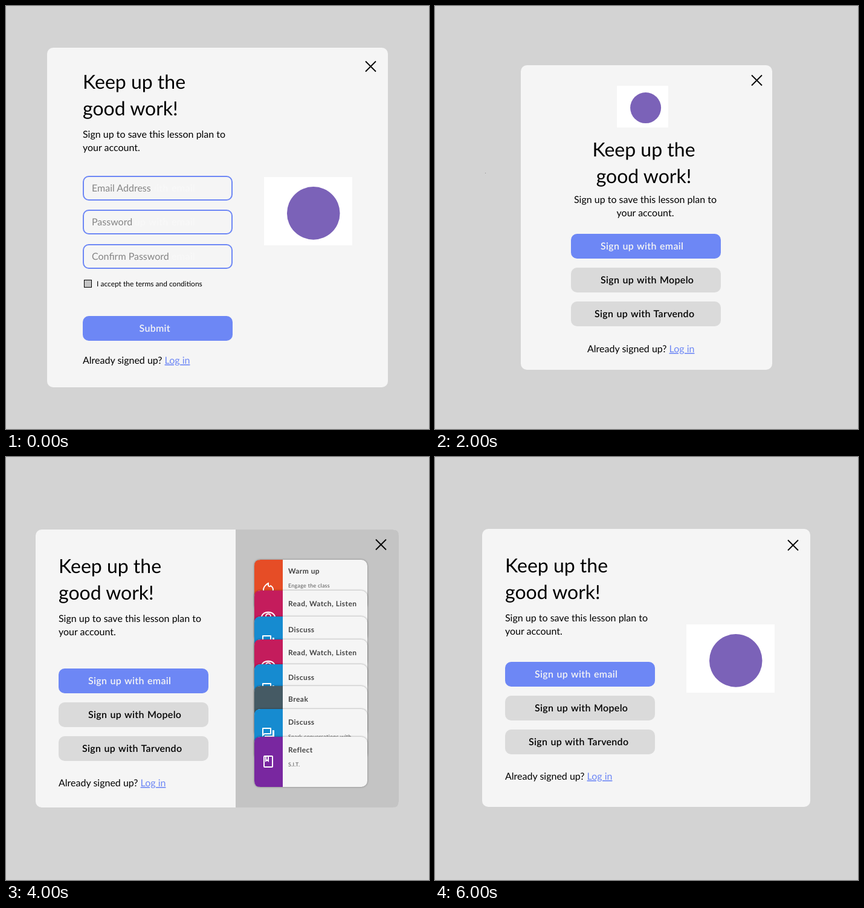
Animation, 700 px wide and 700 px high, one loop 7 s. Source, as an HTML page:

```html
<!DOCTYPE html>
<html lang="en">
<head>
<meta charset="utf-8">
<title>Sign-up dialogs</title>
<style>
  html, body { margin: 0; height: 100%; overflow: hidden; background: #d3d3d3; }
  svg { display: block; width: 700px; height: 700px; }
  text { font: 16px Lato, sans-serif; text-rendering: geometricPrecision; }
  .head { font-size: 32px; }
  .label { font-weight: 600; letter-spacing: .3px; word-spacing: 1px; }
  .hint { fill: #858585; }
  .ghost { fill: #f8f8f8; }
  .terms { font-size: 12px; }
  .title { font-size: 12px; font-weight: 700; letter-spacing: .45px; fill: #444; }
  .note { font-size: 9px; letter-spacing: .25px; fill: #555; }
  .link { fill: #6d87f5; text-decoration: underline 1px; }
  .card { filter: drop-shadow(0 .5px 1.5px rgba(0, 0, 0, .4)); }
  .line { fill: none; stroke: #fff; stroke-width: 2; }
</style>
</head>
<body>
<svg id="stage" viewBox="0 0 700 700"></svg>
<script>
const BLUE = '#6d87f5', PAPER = '#f5f5f5', GREY = '#c4c4c4';

const text = (x, y, str, cls = '', anchor = 'start') =>
  `<text x="${x}" y="${y}" class="${cls}" text-anchor="${anchor}">${str}</text>`;
const rect = (x, y, w, h, fill, r = 0, extra = '') =>
  `<rect x="${x}" y="${y}" width="${w}" height="${h}" rx="${r}" fill="${fill}" ${extra}/>`;

const panel = (x, y, w, h) => rect(x, y, w, h, PAPER, 10);

// Right part of a panel, rounded only on its outer corners
const side = (x, y, w, h) =>
  `<path fill="${GREY}" d="M${x} ${y}h${w - 10}q10 0 10 10v${h - 20}q0 10 -10 10h${10 - w}z"/>`;

const cross = (x, y) =>
  `<path d="M${x - 8.5} ${y - 8.5}l17 17m0 -17l-17 17" stroke="#000" stroke-width="1.8"/>`;

const intro = (x, y, anchor = 'start', subX = x, gap = 81) =>
  text(x, y, 'Keep up the', 'head', anchor) +
  text(x, y + 44, 'good work!', 'head', anchor) +
  text(subX, y + gap, 'Sign up to save this lesson plan to', '', anchor) +
  text(subX, y + gap + 22, 'your account.', '', anchor);

const login = (x, y) =>
  text(x, y, 'Already signed up? <tspan class="link">Log in</tspan>');

const button = (x, y, str, indent, fill, ink) =>
  rect(x, y, 248, 41, fill, 10) +
  `<g fill="${ink}">${text(x + indent, y + 25.5, str, 'label')}</g>`;

const choices = (x, y) =>
  button(x, y, 'Sign up with email', 49, BLUE, PAPER) +
  button(x, y + 56, 'Sign up with Mopelo', 49, '#dadada', '#000') +
  button(x, y + 112, 'Sign up with Tarvendo', 39, '#dadada', '#000');

// The faint label shows only to the right of the hint
const field = (x, y, hint, hintWidth) =>
  rect(x + 1, y + 1, 246, 39, PAPER, 9, `stroke="${BLUE}" stroke-width="2"`) +
  text(x + 49, y + 25.5, 'Sign up with email', 'label ghost') +
  rect(x + 13, y + 8, hintWidth, 26, PAPER) +
  text(x + 15, y + 26, hint, 'hint');

const form = (x, y, boxX, boxY) =>
  field(x, y, 'Email Address', 106) + field(x, y + 56, 'Password', 74) +
  field(x, y + 113, 'Confirm Password', 133) +
  rect(boxX + .5, boxY + .5, 12, 12, GREY, 0, 'stroke="#000"') +
  text(boxX + 21, boxY + 10.5, 'I accept the terms and conditions', 'terms') +
  button(x, y + 232, 'Submit', 93.5, BLUE, PAPER);

const logo = (x, y, w, h) =>
  rect(x, y, w, h, '#fff') +
  `<circle cx="${x + w * .56}" cy="${y + h * .53}" r="${w * .3}" fill="#7b62b8"/>`;

const icons = {
  flame: `<path class="line" transform="translate(0 11)" d="M16 6l-.4.5C14.4 8 12 7.2 12 5.3V2
    S4 6 4 13c0 4.4 3.6 8 8 8s8-3.6 8-8c0-3-1.6-5.6-4-7z"/>`,
  eye: `<g class="line" transform="translate(0 1.5)"><path d="M1 12C5 3 19 3 23 12C19 21 5 21 1 12z"/>
    <circle cx="12" cy="12" r="4"/></g>`,
  chat: `<path fill="#fff" d="M15 4v7H5.2L4 12.2V4h11m1-2H3q-1 0-1 1v14l4-4h10q1 0 1-1V3q0-1-1-1z
    m5 4h-2v9H6v2q0 1 1 1h11l4 4V7q0-1-1-1z"/>`,
  book: `<g class="line"><rect x="5" y="3" width="14" height="18" rx="1"/>
    <path d="M8 3v8l2-1.5 2 1.5V3"/></g>`,
  none: ''
};

const plan = [
  [0, '#e64d26', 'flame', 'Warm up', 'Engage the class'],
  [51, '#c41c5c', 'eye', 'Read, Watch, Listen', ''],
  [94, '#168bd0', 'chat', 'Discuss', ''],
  [132, '#c41c5c', 'eye', 'Read, Watch, Listen', ''],
  [173, '#168bd0', 'chat', 'Discuss', ''],
  [209, '#455a64', 'none', 'Break', ''],
  [247, '#168bd0', 'chat', 'Discuss', 'Spark conversations with'],
  [293, '#7927a0', 'book', 'Reflect', 'S.I.T.']
];

const cards = (x, y) => plan.map(([top, color, icon, title, note], i) => {
  const lift = i ? 0 : 3;
  return `<g class="card" transform="translate(${x} ${y + top})">
    ${rect(0, 0, 187, 83, PAPER, 10)}
    <path fill="${color}" d="M47 0H10Q0 0 0 10V73Q0 83 10 83H47z"/>
    <g transform="translate(11 ${29 - lift})">${icons[icon]}</g>
    ${text(56, 25.5 - lift, title, 'title')}${text(56, 49 - lift, note, 'note')}</g>`;
}).join('');

const compact = panel(142, 98, 416, 504) + cross(532.5, 123) + logo(301, 132, 85, 69) +
  intro(345.5, 249, 'middle', 348, 77) + choices(225, 377) + login(252, 573);

const scenes = [
  panel(68, 69, 564, 562) + cross(603.5, 100) + intro(127, 137) +
    form(127, 281, 129, 453) + login(127, 592) + logo(427, 283, 146, 113),
  panel(50, 69, 599, 562) + side(379, 69, 270, 562) + cross(624.5, 97) + intro(88, 138) +
    form(88, 282, 90, 454) + login(88, 593) + cards(420, 172),
  compact + rect(83, 276, 1, 1, '#888'),
  panel(162, 69, 382, 562) + cross(513.5, 104) + intro(347, 147, 'middle', 353) +
    form(229, 281, 241, 452) + login(256, 592),
  panel(49, 120, 601, 460) + side(380, 120, 270, 460) + cross(620.5, 145) + intro(87, 192) +
    choices(87, 350) + login(87, 545) + cards(411, 170),
  compact,
  panel(78, 119, 543, 460) + cross(592.5, 146) + intro(116, 191) +
    choices(116, 339) + login(116, 534) + logo(416, 277, 146, 113)
];

const stage = document.getElementById('stage');
stage.innerHTML = scenes.map(s => `<g>${s}</g>`).join('');

function draw() {
  const current = Math.floor(performance.now() / 1000) % scenes.length;
  [...stage.children].forEach((g, i) => { g.style.display = i === current ? '' : 'none'; });
  requestAnimationFrame(draw);
}
draw();
</script>
</body>
</html>
```
